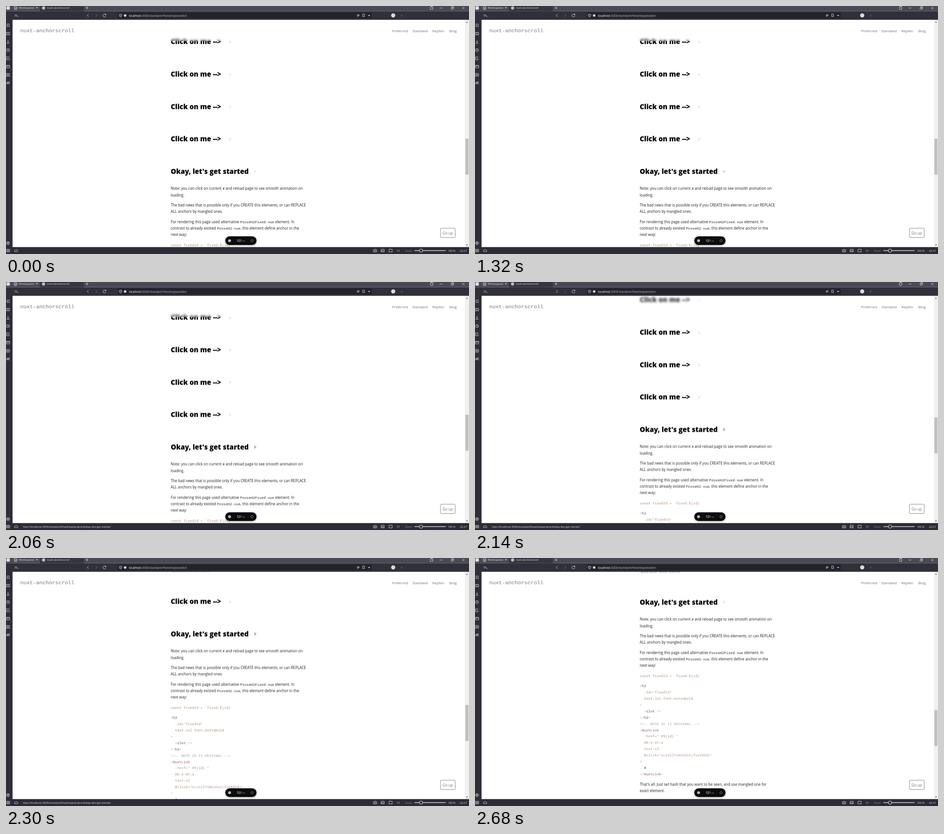
These frames come from a looping animation (1023 by 548 pixels, 2.94 s). An HTML page:

```html
<!DOCTYPE html>
<html lang="en">
<head>
<meta charset="utf-8">
<title>nuxt-anchorscroll</title>
<style>
html, body { margin: 0; width: 100%; height: 100%; overflow: hidden; background: #fff; }
svg { position: absolute; left: 0; top: 0; width: 1023px; height: 548px; }
text { font-family: "Open Sans", "Noto Sans", sans-serif; white-space: pre; }
.body { font-size: 8.13px; fill: #1c1c1c; }
.head { font-size: 15.05px; font-weight: 800; fill: #000; }
.hash { font-size: 9.6px; fill: #ddd; }
.code, .mono { font-family: "Noto Sans Mono", "DejaVu Sans Mono", monospace; font-size: 7.85px; }
.code { fill: #999; }
.mono { fill: #222; }
.k { fill: #a38383; } .v { fill: #b3926b; } .s { fill: #b48f84; } .n { fill: #a0a0a0; }
.t { fill: #4a5160; } .c { fill: #9a5c62; } .a { fill: #ae9274; } .d { fill: #444; }

#header {
  position: absolute; left: 14px; top: 30px; width: 1000px; height: 48px;
  backdrop-filter: blur(2.1px); background: #ffffff33;
}
.brand { font: 11.73px "Liberation Mono", monospace; fill: #777; }
.nav { font-size: 8px; fill: #707070; }
.ui { font-size: 6.05px; fill: #e8e8ec; }
.url { font-size: 6.5px; fill: #b9b9c1; }
.foot { font-size: 5.88px; fill: #e2e2e6; }
.ico { fill: none; stroke: #d6d6dc; stroke-width: .9; }

#doc, #thumb, #link, #status { animation: 2940ms linear infinite; }
#doc { animation-name: scroll; --a: -118px; --b: -243px; --end: -267.8px; }
#thumb { animation-name: scroll; --a: 19px; --b: 39px; --end: 43px; }
#link { animation-name: hover; animation-timing-function: step-end; }
#status { animation-name: status; animation-timing-function: step-end; }
@keyframes scroll {
  0%, 69.592% { transform: translateY(0); animation-timing-function: cubic-bezier(.4, 0, .6, .41); }
  75.51% { transform: translateY(var(--a)); animation-timing-function: cubic-bezier(.33, .37, .67, .78); }
  80.272% { transform: translateY(var(--b)); animation-timing-function: cubic-bezier(.33, .64, .67, 1); }
  82.993%, 100% { transform: translateY(var(--end)); }
}
@keyframes hover {
  0% { fill: #ddd; }
  44.898% { fill: #bbb; }
  47.619% { fill: #999; }
  51.02% { fill: #858585; }
  55.782% { fill: #7c7c7c; }
  87.755% { fill: #999; }
  89.456% { fill: #bbb; }
  91.156%, 100% { fill: #ddd; }
}
@keyframes status {
  0% { opacity: 0; }
  47.619% { opacity: .5; }
  51.02% { opacity: 1; }
  79.592% { opacity: .75; }
  80.272% { opacity: .5; }
  80.952% { opacity: .25; }
  81.633%, 100% { opacity: 0; }
}
</style>
</head>
<body>
<svg viewBox="0 0 1023 548"><g id="doc"></g></svg>
<div id="header"></div>

<svg viewBox="0 0 1023 548">
  <text class="brand" x="31.5" y="57.5">nuxt-anchorscroll</text>
  <g class="nav">
    <text x="853" y="58">Preferred</text>
    <text x="898" y="58">Standard</text>
    <text x="942" y="58">Repfen</text>
    <text x="979.5" y="58">Blog</text>
  </g>
  <rect x="960" y="491" width="32.5" height="20.5" rx="2" fill="#fff" stroke="#777" stroke-width=".9"/>
  <text x="964.5" y="504.8" font-size="8.2" fill="#777">Go up</text>

  <!-- scrollbar -->
  <rect x="1014" y="30" width="9" height="503" fill="#f1f1f1"/>
  <rect id="thumb" x="1015" y="293" width="7" height="79.5" fill="#c1c1c1"/>
  <path d="M1016.5 37l2-2.4 2 2.4zM1016.5 527l2 2.4 2-2.4z" fill="#555"/>

  <!-- floating pill -->
  <g style="filter: drop-shadow(0 1px 2px #0006)">
    <rect x="484.5" y="509" width="69" height="19" rx="9.5" fill="#0c0c0c"/>
  </g>
  <circle cx="494" cy="518.6" r="3.2" fill="#bbb"/>
  <path d="M503.5 514v9M534.5 514v9" stroke="#222" stroke-width=".6"/>
  <text x="509.7" y="521" font-size="6.4" font-weight="600" fill="#eee">121</text>
  <text x="522" y="520.8" font-size="4.6" fill="#999">ms</text>
  <g fill="none" stroke="#8a8a8a" stroke-width=".7">
    <circle cx="543.5" cy="518.5" r="2.4"/>
    <path d="M543.5 515v2M543.5 520v2M540 518.5h2M545 518.5h2"/>
  </g>

  <!-- window frame -->
  <rect width="1023" height="11.5" fill="#4a4a55"/>
  <path d="M75 11.5V2q0-2 2-2h93q2 0 2 2v9.5z" fill="#363640"/>
  <rect y="11.5" width="1023" height="19" fill="#30303a"/>
  <rect y="30" width="14.5" height="518" fill="#2e2e38"/>
  <rect y="532.7" width="1023" height="15.3" fill="#2c2c36"/>
  <rect x="247" y="14.5" width="561" height="12.5" rx="1.5" fill="#22222a"/>

  <rect x="1" y="0.5" width="7.5" height="7.5" rx="1.5" fill="#dcdce0"/>
  <circle cx="83" cy="4.3" r="3.6" fill="#b4bcc0"/>
  <circle cx="263.3" cy="21" r="2.8" fill="#dcdce0"/>
  <circle cx="855.5" cy="20.8" r="4.6" fill="#dddcd8"/>
  <path d="M871 21l5-3.5v7z" fill="#2f5257"/>
  <g class="ui">
    <text x="28.5" y="6.3">Workspaces</text>
    <text x="90.8" y="6.4">nuxt-anchorscroll</text>
  </g>
  <text class="url" x="271.5" y="23.6"><tspan fill="#fff">localhost</tspan>:3000/standard/fixed/explanation</text>
  <path d="M66 2.8h4.6l-2.3 2.6zM799.8 20h5l-2.5 2.8z" fill="#d6d6dc"/>

  <g class="ico">
    <path d="M17.5 2.8l3.7-1.8 3.7 1.8-3.7 1.8zM17.5 4.8l3.7 1.8 3.7-1.8M17.5 6.6l3.7 1.8 3.7-1.8"/>
    <path d="M176 4.2h6M179 1.2v6"/>
    <path d="M937.8 1.8h5.4v5.6h-5.4zM939 1.5v-1h3v1"/>
    <path d="M958.5 4.5h5.5M983.5 3h4v4h-4zM985 3V1.5h4v4h-1.5M1008 2l5 5M1013 2l-5 5"/>
    <path d="M19 18.5l2.5 2.3-2.5 2.3M22 18.5l2.5 2.3-2.5 2.3M24.5 23h3"/>
    <path d="M182.5 17.7l-3.2 3.1 3.2 3.1"/>
    <path d="M198 17.7l3.2 3.1-3.2 3.1" stroke="#777780"/>
    <path d="M220 18.8a3.3 3.3 0 1 0 .8 2.6M220.8 16.8v2.6h-2.6"/>
    <path d="M253 17.8l2.8 1v2q0 2.5-2.8 3.8-2.8-1.3-2.8-3.8v-2zM253 19v3.6"/>
    <path d="M775.5 19.3h5.5M775.5 21h5.5M775.5 22.7h3.5M788 17.8h4v6l-2-1.6-2 1.6z"/>
    <!-- side panel -->
    <path d="M2.6 39.7h4.4v6.2l-2.2-1.7-2.2 1.7z"/>
    <path d="M1 58.3h7v5.4h-7zM4.5 58.3v5.4"/>
    <path d="M4.5 75.5v5M2.4 78.5l2.1 2.1 2.1-2.1M1.2 82.5h6.6"/>
    <circle cx="4.5" cy="97.5" r="3.3"/><path d="M4.5 95.5v2.2h1.7"/>
    <path d="M6 112.4H1.4v6.4h5.8v-3M3.5 116.8l4-4.4"/>
    <path d="M1.2 131h6.8v5.8H1.2zM1.2 132.8h6.8"/>
    <path d="M1.2 149.2h6.6v6H1.2zM4.5 150.4v3.6M2.7 152.2h3.6"/>
    <path d="M1 173l2.2-5.5L5.4 173M2 171h2.5M4.6 168h4M6.7 167v1.2q0 2.3-1.5 3.8M6 169.5l2.8 3"/>
    <circle cx="4.5" cy="523.8" r="2.8"/><circle cx="4.5" cy="523.8" r="1"/>
    <circle cx="4.5" cy="523.8" r="3.6" stroke-dasharray="1.4 1.43"/>
    <!-- bottom bar -->
    <path d="M1.2 537.7h7v5.6h-7zM3.2 539.4h3v2.2h-3z"/>
    <path d="M20 542.8a1.7 1.7 0 0 1 .2-3.4 2.5 2.5 0 0 1 4.6.4 1.5 1.5 0 0 1 0 3z"/>
    <path d="M811.8 538.5h1.8l.7-1h2.4l.7 1h1.8v4.8h-7.4z"/><circle cx="815.5" cy="540.8" r="1.2"/>
    <path d="M828.8 537.6h6.8v5.6h-6.8zM829 542.3l2-2.3 1.5 1.4 1.2-1 1.8 2"/>
    <path d="M846.2 537.4h7v6h-7z"/>
    <path d="M865.6 538.8l-1.8 1.8 1.8 1.8M867.6 538.8l1.8 1.8-1.8 1.8"/>
    <path d="M902.5 540.5h69" stroke-width="1.5"/>
    <circle cx="917" cy="540.5" r="3.5" fill="#2c2c36" stroke-width="1.1"/>
  </g>
  <g class="foot">
    <text id="status" x="37.3" y="542.6">http://localhost:3000/standard/fixed/explanation#okay-lets-get-started</text>
    <text x="881.8" y="542.6" fill="#85858e">Reset</text>
    <text x="976.5" y="542.6">100 %</text>
    <text x="1003" y="542.6">22:27</text>
  </g>
</svg>

<script>
const doc = document.getElementById('doc');
const esc = s => s.replace(/&/g, '&amp;').replace(/</g, '&lt;');
// {class:words| marks a coloured run
const mark = s => esc(s).replace(/\{(\w+):([^|]*)\|/g, '<tspan class="$1">$2</tspan>');
const put = (cls, x, y, s, id = '') =>
  `<text class="${cls}" x="${x}" y="${y}"${id && ` id="${id}"`}>${mark(s)}</text>`;

let out = '';
for (let i = 0; i < 4; i++) {
  const y = 84.3 + 71.6 * i;
  out += put('head', 364, y, 'Click on me --\u003e') + put('hash', 492.3, y - 1.4, '#');
}
out += put('head', 364, 370.8, "Okay, let's get started") + put('hash', 547.3, 369.4, '#', 'link');

[
  [406.3, 'Note: you can click on current {mono:#| and reload page to see smooth animation on'],
  [420.7, 'loading.'],
  [443.1, 'The bad news that is possible only if you CREATE this elements, or can REPLACE'],
  [457.3, 'ALL anchors by mangled ones.'],
  [479.7, 'For rendering this page used alternative {mono:ProseH2Fixed.vue| element. In'],
  [494.1, 'contrast to already existed {mono:ProseH2.vue|, this element define anchor in the'],
  [508.4, 'next way:'],
  [770.6, "That's all. Just set hash that you want to be seen, and use mangled one for"],
  [784.9, 'exact element.']
].forEach(([y, s]) => out += put('body', 364, y, s));

out += put('code', 364, 530.6, '{k:const| {v:fixedId| = {s:`fixed-${id}`|');
[
  '<{t:h2|',
  '  {a::id|={s:"fixedId"|',
  '  {a:text-3xl font-extrabold|',
  '>',
  '  <{t:slot| />',
  '</{t:h2|>',
  '{n:<|{n:!-- NOTE ID IS ORIGINAL --|{n:>|',
  '<{c:NuxtLink|',
  '  {a::href|={s:"`#${id}`"|',
  '  {a:mb-a mt-a|',
  '  {a:text-xl|',
  '  {a:@click|={s:"scrollToAnchor(fixedId)"|',
  '>',
  '  {d:#|',
  '</{c:NuxtLink|>'
].forEach((s, i) => out += put('code', 364, 553 + 13.93 * i, s));
doc.innerHTML = out;
</script>
</body>
</html>
```
